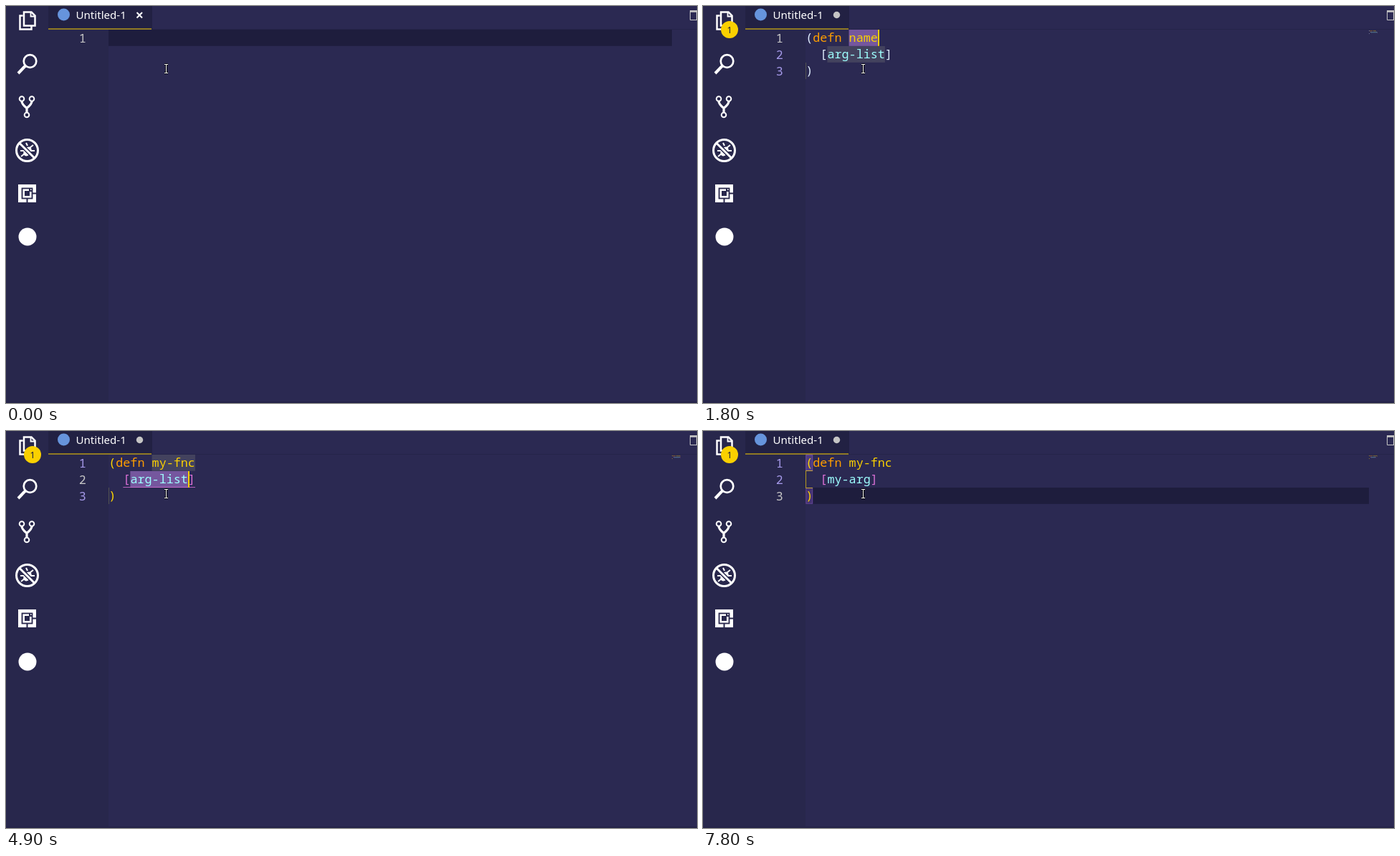
An HTML page for the animation above (8 s loop, 964 px wide and 554 px high).

```html
<!DOCTYPE html>
<html lang="en">
<head>
<meta charset="utf-8">
<title>Snippet completion</title>
<style>
  html, body { margin: 0; width: 100%; height: 100%; overflow: hidden; background: #2b2952; }
  svg { display: block; }
  text { white-space: pre; font: 16.775px "Noto Sans Mono", "DejaVu Sans Mono", monospace; }
  .ui { font: 15.1px "Noto Sans", "Open Sans", sans-serif; }
  .bold { font-weight: 700; }
</style>
</head>
<body>
<svg width="964" height="554" viewBox="0 0 964 554">
  <rect width="964" height="554" fill="#2b2952"/>
  <rect width="143" height="554" fill="#28274c"/>
  <rect x="59" width="905" height="32" fill="#2b2952"/>
  <rect x="203" y="32" width="761" height="1" fill="#252449"/>
  <rect y="552" width="964" height="2" fill="#242347"/>
  <rect x="59" width="145" height="32" fill="#222143"/>
  <rect x="59" y="31.500" width="144" height="1" fill="#fad000"/>
  <circle cx="80.500" cy="12" r="8.500" fill="#6694dc"/>
  <text class="ui" x="97.500" y="17.500" fill="#fff">Untitled-1</text>
  <path d="M964 6.500H954.500V19.500H964M963.500 7V19" fill="none" stroke="#c5c5c5"/>
  <path d="M954 7.500H964" stroke="#c5c5c5" stroke-width="2.500"/>

  <g fill="none" stroke="#fff">
    <path d="M23.500 13.500H19.500V32.500H35.500V28.500M25 8.500H35.500L40.500 13.500V27.500H25Z" stroke-width="2.500"/>
    <path d="M34.500 8V14.500H41" stroke-width="1.800"/>
    <circle cx="33.500" cy="77" r="8.800" stroke-width="2.700"/>
    <path d="M27 83.500L17 94" stroke-width="4"/>
    <g stroke-width="2">
      <circle cx="22" cy="129.500" r="3.300"/>
      <circle cx="36" cy="129.500" r="3.300"/>
      <circle cx="29" cy="152" r="3.300"/>
    </g>
    <path d="M22 133Q22 137 29 142.500Q36 137 36 133M29 142V149" stroke-width="3.200"/>
    <path d="M20 202H26M33 202H40M21 210L26 206M33 198L38 194M35 206L39 209M28 191L30 195" stroke-width="2"/>
    <ellipse cx="30" cy="203" rx="5" ry="7" transform="rotate(35 30 203)" fill="#fff" stroke="none"/>
    <path d="M19 191.500L40 212.500" stroke="#28274c" stroke-width="6"/>
    <path d="M19 191.500L40 212.500" stroke-width="3"/>
    <circle cx="29.500" cy="201.500" r="15" stroke-width="3"/>
  </g>
  <rect x="17" y="249" width="25" height="25" fill="#fff"/>
  <g fill="none" stroke="#28274c" stroke-width="2">
    <rect x="22.500" y="254.500" width="14" height="14" stroke-width="1.800"/>
    <rect x="26" y="258" width="7" height="7" fill="#28274c" stroke="none"/>
    <path d="M29.500 268V274M36 261.500H42M33 254V258H37"/>
  </g>
  <circle cx="30" cy="322" r="12.500" fill="#fff"/>
  <g id="live"></g>
</svg>
<script>
const LOOP = 8000, X0 = 143.2, CW = 10.065, Y0 = 33, LH = 22.8;
const YELLOW = '#fad000', ORANGE = '#ff9d00', CYAN = '#9effff', PALE = '#e1efff',
      LAVENDER = '#a599e9', DARK = '#1e1d3d', GOLD = '#ffd700', ORCHID = '#da70d6', GREY = '#c5c5c5';
const ITEMS = ['defmethod', 'defmulti', 'defn', 'defprotocol', 'defrecord', 'deftype'];

// Each step changes part of the editor state from its time on.
const STEPS = [
  [0, { word: '', line: 0, col: 0, high: true }],
  [100, { caret: true }],
  [600, { word: 'd', col: 1, pop: 1 }],
  [800, { word: 'de', col: 2, pop: 2 }],
  [1000, { word: 'def', col: 3, pop: 3 }],
  [1100, { word: 'defn', col: 4 }],
  [1200, { pop: 4 }],
  [1500, { single: true }],
  [1700, { pop: 0, name: 'name', args: 'arg-list', stops: true, col: 10, pick: 4, high: false }],
  [2000, { tinted: true, scope: 'outer' }],
  [2500, { name: 'm', col: 7, pick: 0, high: true, scope: '' }],
  [2600, { scope: 'outer' }],
  [3200, { name: 'my', col: 8 }],
  [3700, { name: 'my-', col: 9 }],
  [3900, { name: 'my-f', col: 10 }],
  [4000, { name: 'my-fn', col: 11 }],
  [4300, { name: 'my-fnc', col: 12 }],
  [4800, { line: 1, col: 11, pick: 8, high: false, scope: '' }],
  [4900, { scope: 'inner' }],
  [5500, { args: 'm', col: 4, pick: 0, high: true }],
  [5600, { match: 'inner' }],
  [5800, { args: 'my', col: 5, scope: '' }],
  [6300, { caret: false }],
  [6500, { args: 'my-', col: 6, caret: true }],
  [6600, { args: 'my-a', col: 7 }],
  [6800, { args: 'my-ar', col: 8 }],
  [7100, { args: 'my-arg', col: 9 }],
  [7300, { line: 2, col: 0, stops: false, match: 'outer' }],
  [7400, { scope: 'outer' }],
  [7800, { caret: false }]
];

const colX = c => X0 + c * CW;
const lineY = l => Math.round(Y0 + l * LH);
const rect = (x, y, w, h, fill, more = '') =>
  `<rect x="${x}" y="${y}" width="${w}" height="${h}" fill="${fill}" ${more}/>`;
const text = (x, y, str, fill, cls = '') =>
  `<text x="${x}" y="${y}" fill="${fill}" class="${cls}">${str}</text>`;
const stroke = (d, color, w = 1, more = '') =>
  `<path d="${d}" fill="none" stroke="${color}" stroke-width="${w}" ${more}/>`;
const cells = (l, c, n, fill, more) => rect(colX(c), lineY(l), n * CW, LH, fill, more);

// Tokens of each code line: column, text, colour.
function tokens(s) {
  if (!s.name) return [[[0, s.word, CYAN]]];
  const outer = s.tinted ? GOLD : PALE, inner = s.tinted ? ORCHID : PALE;
  return [
    [[0, '(', outer], [1, 'defn', ORANGE], [6, s.name, YELLOW]],
    [[2, '[', inner], [3, s.args, CYAN], [3 + s.args.length, ']', inner]],
    [[0, ')', outer]]
  ];
}

function decorations(s) {
  let out = '';
  if (s.high) out += rect(143, lineY(s.line), 786, LH, DARK);
  if (s.pick) out += cells(s.line, s.col - s.pick, s.pick, '#b362ff', 'opacity=".53"');
  if (s.stops) {
    const grey = 'fill-opacity=".3"';
    out += cells(0, 6, s.name.length, '#7c7c7c', grey) + cells(1, 3, s.args.length, '#7c7c7c', grey) +
      rect(143, 79, 1, 23, '#525252');
  }
  const box = (l, c) => rect(colX(c) + .5, lineY(l) + .5, CW - 1, LH - 1, '#ad70fc',
    'fill-opacity=".27" stroke="#ad70fc" stroke-opacity=".4"');
  const end = s.args ? 3 + s.args.length : 0;
  if (s.match === 'inner') out += box(1, 2) + box(1, end);
  if (s.match === 'outer') out += box(0, 0) + box(2, 0);
  if (s.scope === 'outer') out += stroke('M153 55.500H143.500V79.500H153', GOLD, 1, 'opacity=".65"');
  if (s.scope === 'inner') out += stroke(`M${colX(2)} 78.500H${colX(end + 1)}`, ORCHID, 1, 'opacity=".8"');
  return out;
}

function code(s) {
  const lines = tokens(s);
  let out = '';
  lines.forEach((line, l) => {
    const y = lineY(l) + 17.2;
    out += text(101.8, y + .5, l + 1, l === s.line ? '#c6c6c6' : LAVENDER);
    for (const [c, str, color] of line) {
      out += text(colX(c), y, str, color);
      [...str].forEach((ch, i) => {
        out += rect(929 + c + i, 34 + l * 2 + (i + c) % 2 * .5, 1, 1, color, 'opacity=".4"');
      });
    }
  });
  if (s.caret) out += rect(Math.round(colX(s.col)), lineY(s.line), 2, LH, YELLOW);
  return out;
}

function popup(s) {
  const left = Math.round(colX(s.pop)), items = s.single ? ['defn'] : ITEMS;
  const hit = s.single ? 4 : Math.min(s.pop, 3), row = 22.7;
  let out = rect(left, 57, 396, items.length * row, DARK) + rect(left + 1, 57, 394, 23, '#2b2952');
  items.forEach((item, i) => {
    const y = 57 + i * row, x = left + 27;
    out += rect(left + 6.5, y + 5, 13, 12.5, '#252526') +
      stroke(`M${left + 6.5} ${y + 18}V${y + 5}H${left + 19.5}V${y + 18}`, GREY, 1.4) +
      stroke(`M${left + 6} ${y + 18.5}h14`, GREY, 1.4, 'stroke-dasharray="2 1"') +
      text(x - .5, y + 17, item.slice(0, hit), YELLOW, 'bold') +
      text(x - .5 + hit * CW, y + 17, item.slice(hit), LAVENDER);
  });
  return out + docs(left + 396, s.single);
}

function docs(left, single) {
  const x = left + 7, [cmd, rest, args] = single ? ['defn', 'name', 'arg-list'] : ['defmethod', 'name match', 'args'];
  const at = n => x + n * CW;
  return rect(left, 57, 396, 108, DARK) +
    text(x, 79, `${cmd} (Clojure snippets)`, '#7267ae') +
    text(x, 110, '(', PALE) + text(at(1), 110, cmd, ORANGE) + text(at(cmd.length + 2), 110, rest, YELLOW) +
    text(x, 132, '[', PALE) + text(at(1), 132, args, CYAN) + text(at(args.length + 1), 132, ']', PALE) +
    text(x, 153.5, ')', PALE) +
    stroke(`M${left + 374} 65.500l6.500 6.500m0 -6.500l-6.500 6.500`, GREY, 1.8);
}

function pointer(hand) {
  if (hand) {
    return '<path d="M220 85.500q1.500-2 3 0l2 4 4.500.500q2 .500 2 3l-.500 4-2 3h-6l-5-5.500q-.500-2 1.500-2l2 1z" ' +
      'fill="#fff" stroke="#111" stroke-width="1"/>';
  }
  const beam = 'M221 81.500H226M223.500 81.500V93.500M221 93.500H226';
  return stroke(beam, '#000', 2.6) + stroke(beam, '#fff', 1);
}

function chrome(s) {
  if (!s.word) return stroke('M182.500 9L190 16.500M190 9L182.500 16.500', '#fff', 2);
  return '<circle cx="186.500" cy="12.500" r="4.700" fill="#c5c5c5"/>' +
    `<circle cx="37" cy="33" r="12" fill="${YELLOW}"/>` +
    '<text class="ui" x="37" y="37.500" text-anchor="middle" style="font-size:12.500px" fill="#1e1e3f">1</text>';
}

const live = document.getElementById('live');
let shown = -1;

function draw(now) {
  const t = now % LOOP;
  const count = STEPS.filter(([start]) => start <= t).length;
  if (count !== shown) {
    shown = count;
    const s = Object.assign({}, ...STEPS.slice(0, count).map(step => step[1]));
    live.innerHTML = chrome(s) + decorations(s) + code(s) + (s.pop ? popup(s) : '') + pointer(s.pop);
  }
}

const begin = performance.now();
function tick() {
  draw(performance.now() - begin);
  requestAnimationFrame(tick);
}
tick();
</script>
</body>
</html>
```
